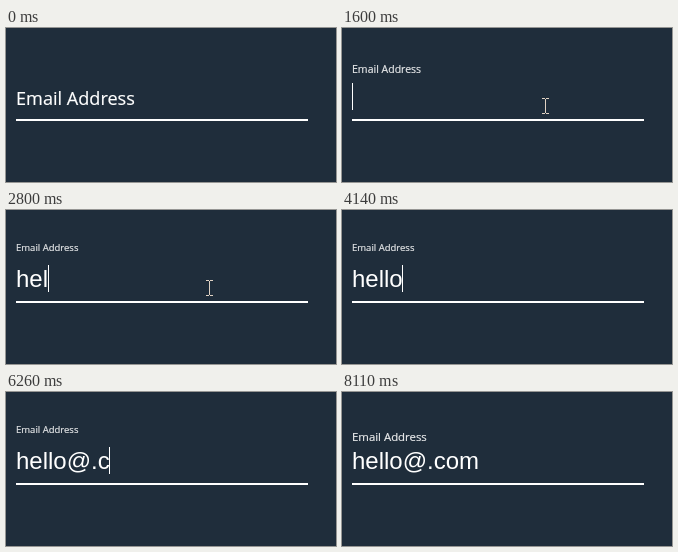
Write an HTML page that moves like this. It is 330x154 px and loops after 8180 ms.

```html
<!DOCTYPE html>
<html lang="en">
<head>
<meta charset="utf-8">
<title>Floating label</title>
<style>
  html, body { margin: 0; width: 100%; height: 100%; overflow: hidden; background: #1f2d3b; }
  svg { display: block; width: 330px; height: 154px; }
  #label { font-family: "Open Sans", "Noto Sans", sans-serif; fill: #fff; stroke: #fff; stroke-width: .2px; }
  #value { font: 24px "Liberation Sans", Arial, sans-serif; fill: #fff; }
  #tip text {
    font: 12px "Noto Sans CJK KR", "Noto Sans CJK", "Noto Sans CJK JP", sans-serif;
    letter-spacing: .2px; word-spacing: 2px; fill: #4a4a4a;
  }
</style>
</head>
<body>
<svg viewBox="0 0 330 154">
  <rect width="330" height="154" fill="#1f2d3b"/>
  <rect x="10" y="91" width="292" height="2" fill="#fff"/>
  <text id="label" x="10"></text>
  <text id="value" x="10" y="77"></text>
  <rect id="caret" y="55" width="1" height="27" fill="#fff"/>
  <g id="tip">
    <rect x="211.5" y="92.5" width="140" height="24" fill="#fff" stroke="#2b2b2b"/>
    <text x="219.5" y="109.5">이 입력란을 작성하세요.</text>
  </g>
  <path id="beam" d="M0 .5h3m1 0h3M3.5 1v14M0 15.5h3m1 0h3" fill="none" stroke="#e0d2c3"/>
  <path id="arrow" d="M.5 .5v15.6l3.6-3.4 2.4 5.6 2.2-1-2.4-5.4h5z" fill="#fff" stroke="#000"/>
  <circle id="click" cx="201" cy="77" r="12" fill="#ff0" fill-opacity=".48"/>
</svg>
<script>
const LOOP = 8180;
const $ = id => document.getElementById(id);
const [label, value, caret, tip, click, beam, arrow] =
  ['label', 'value', 'caret', 'tip', 'click', 'beam', 'arrow'].map($);
label.textContent = 'Email Address';

// Each track: [start ms, state], held until the next entry.
const typed = [[0, ''], [2330, 'h'], [2400, 'he'], [2800, 'hel'], [2950, 'hell'], [3080, 'hello'],
  [4340, 'hello@'], [6060, 'hello@.'], [6260, 'hello@.c'], [6340, 'hello@.co'], [6520, 'hello@.com']];
const blink = [[0, 0], [1460, 1], [2000, 0], [2330, 1], [3610, 0], [4140, 1], [4870, 0],
  [5400, 1], [5930, 0], [6060, 1], [7060, 0], [7590, 1], [8110, 0]];
const lift = [[0, 0], [1460, .22], [1530, .64], [1600, .88], [1670, 1], [8110, .78]];
const tipFade = [[0, 0], [2000, .5], [2080, 1], [2330, .5], [2400, 0]];
const press = [[0, 0], [1390, 1], [1460, 0]];
const pointer = [[0, null],
  [130, [arrow, 294, 140]], [200, [arrow, 268, 119]], [270, [arrow, 241, 100]],
  [330, [beam, 221, 80]], [400, [beam, 207, 73]], [530, [beam, 200, 70]],
  [3880, [arrow, 309, 25]], [3950, null],
  [7310, [arrow, 313, 66]], [7380, [arrow, 306, 90]], [7450, [arrow, 297, 115]],
  [7520, [arrow, 289, 138]], [7710, null]];

const at = (track, t) => track.findLast(step => step[0] <= t)[1];
const mix = (a, b, k) => a + (b - a) * k;

function draw(t) {
  const k = at(lift, t);
  label.setAttribute('font-size', mix(18.1, 9.5, k));
  label.setAttribute('y', mix(77, 41.2, k));
  label.style.opacity = mix(1, .88, k);

  const text = at(typed, t);
  if (value.textContent !== text) value.textContent = text;
  const width = text ? value.getComputedTextLength() : 0;
  caret.setAttribute('x', Math.floor(10 + width + .01));
  caret.style.opacity = at(blink, t);
  tip.style.opacity = at(tipFade, t);
  click.style.opacity = at(press, t);

  const spot = at(pointer, t);
  for (const shape of [arrow, beam]) {
    const on = spot && spot[0] === shape;
    shape.style.opacity = on ? 1 : 0;
    if (on) shape.setAttribute('transform', `translate(${spot[1]} ${spot[2]})`);
  }
}

const start = performance.now();
function tick() {
  draw((performance.now() - start) % LOOP);
  requestAnimationFrame(tick);
}
draw(0);
requestAnimationFrame(tick);
</script>
</body>
</html>
```
